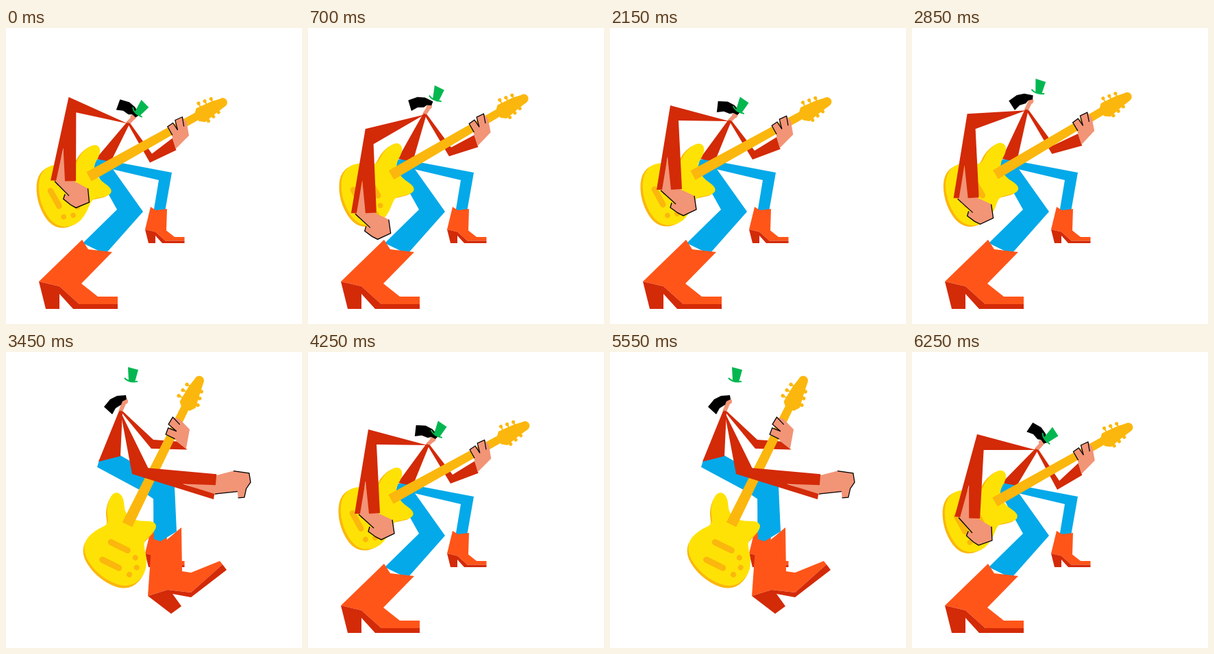
An HTML page with a canvas that plays this animation: 432 by 432 pixels, repeating every 6300 ms.

```html
<!DOCTYPE html>
<html lang="en">
<head>
<meta charset="utf-8">
<title>Guitarist</title>
<style>
html, body { margin: 0; width: 100%; height: 100%; overflow: hidden; background: #fff; }
canvas { display: block; width: 432px; height: 432px; }
</style>
</head>
<body>
<canvas id="stage" width="432" height="432"></canvas>
<script>
const ctx = document.getElementById('stage').getContext('2d');
const LOOP = 2100, STEP = 50, RAD = Math.PI / 180;
const RED = '#d32a08', BLUE = '#04a9e9', ORANGE = '#ff5519', SKIN = '#f29476',
  YELLOW = '#ffe205', GOLD = '#fbb70d', GREEN = '#03b750', BLACK = '#000';

// Key poses: positions, then angle, then scale
const CROUCH = { chest: [174, 136], guitar: [121, 215, -29, .95], fret: [208, 192],
  head: [184, 126, 54], hat: [188, 120, 20] };
const DIP = { chest: [181, 143], guitar: [121, 219, -29.5, .95], fret: [212, 201],
  head: [191, 132, 81], hat: [196, 127, 42] };
const RISE = { chest: [166, 119], guitar: [122, 214, -31, .95], fret: [204, 183],
  head: [173, 103, 12], hat: [184, 91, 2] };
const JUMP = { chest: [167, 87], guitar: [177, 252, -63.7, 1], fret: [212, 141],
  head: [174, 70, 0], hat: [183, 41, 0] };

const lerp = (a, b, k) => a + (b - a) * k;
const lerpAll = (a, b, k) => a.map((v, i) => lerp(v, b[i], k));
const morph = ([a, b], k) => a.map((p, i) => lerpAll(p, b[i], k));
const mix = (a, b, k) =>
  Object.fromEntries(Object.keys(a).map(key => [key, lerpAll(a[key], b[key], k)]));

function ramp(t, from, to) {
  const u = Math.min(1, Math.max(0, (t - from) / (to - from)));
  return u * u * (3 - 2 * u);
}
// Cosine bump that wraps around the loop
function pulse(t, centre, radius) {
  const d = (t - centre + LOOP * 1.5) % LOOP - LOOP / 2;
  return Math.abs(d) < radius ? Math.cos(d / radius * Math.PI / 2) ** 2 : 0;
}

function poseAt(t) {
  const kick = ramp(t, 1130, 1350) - ramp(t, 1680, 1920);
  const dip = pulse(t, 2050, 100) + pulse(t, 575, 150) + pulse(t, 1000, 150);
  const rise = pulse(t, 312, 262) + pulse(t, 788, 212);
  const reach = pulse(t, 1500, 150);
  const strum = Math.sin((t - 14) / 200 * Math.PI) ** 2;

  const pose = mix(mix(mix(CROUCH, RISE, rise), DIP, dip), JUMP, kick);
  pose.guitar[2] += 27 * pulse(t, 575, 110) - 6 * reach;
  pose.hat[1] -= 13 * pulse(t, 1600, 250);

  const [sx, sy] = pose.chest;
  pose.elbow = [
    sx + lerp(-86, 17, kick) + 52 * reach,
    sy + lerp(66 * strum - 42, 91, kick) - 8 * reach,
    lerp(90 + 6 * dip, 8, kick) - 8 * reach];
  pose.kick = kick;
  return pose;
}

function trace(pts) {
  ctx.beginPath();
  pts.forEach(p => ctx.lineTo(...p));
}
function fill(color, pts) {
  trace(pts);
  ctx.fillStyle = color;
  ctx.fill();
}
function line(color, width, pts) {
  trace(pts);
  ctx.strokeStyle = color;
  ctx.lineWidth = width;
  ctx.stroke();
}
function dot(color, x, y, r) {
  ctx.beginPath();
  ctx.arc(x, y, r, 0, 7);
  ctx.fillStyle = color;
  ctx.fill();
}
function blob(color, pts) {
  const mid = (p, q) => [(p[0] + q[0]) / 2, (p[1] + q[1]) / 2];
  ctx.beginPath();
  ctx.moveTo(...mid(pts[pts.length - 1], pts[0]));
  pts.forEach((p, i) => ctx.quadraticCurveTo(...p, ...mid(p, pts[(i + 1) % pts.length])));
  ctx.fillStyle = color;
  ctx.fill();
}
function at([x, y, angle, scale = 1], draw) {
  ctx.save();
  ctx.translate(x, y);
  ctx.rotate(angle * RAD);
  ctx.scale(scale, scale);
  draw();
  ctx.restore();
}
function place([x, y, angle, scale = 1], [u, v]) {
  const c = Math.cos(angle * RAD) * scale, s = Math.sin(angle * RAD) * scale;
  return [x + u * c - v * s, y + u * s + v * c];
}

// Leg shapes: standing, then kicking
const frontLeg = [
  [[131, 192], [146, 192], [200, 268], [145, 330], [112, 314], [162, 265], [128, 204]],
  [[136, 158], [167, 151], [246, 196], [249, 262], [216, 282], [215, 212], [133, 168]]];
const backLeg = [
  [[142, 192], [242, 211], [232, 268], [215, 270], [223, 222], [142, 203]],
  [[160, 160], [240, 200], [232, 268], [215, 270], [216, 215], [150, 170]]];
const shaft = [
  [[111, 309], [120, 323], [155, 327]],
  [[213, 272], [230, 278], [256, 256]]];
const upper = [
  [[110, 373], [134, 392], [163, 392], [163, 403], [107, 403], [78, 377], [48, 370]],
  [[257, 320], [270, 322], [312, 305], [316, 310], [270, 351], [236, 347], [207, 356]]];
const sole = [
  [[163, 410], [98, 410], [78, 388], [78, 410], [58, 410]],
  [[322, 318], [270, 358], [243, 353], [256, 371], [241, 382]]];

function drawBoot(top, k) {
  const foot = morph(upper, k);
  fill(ORANGE, [...top, ...foot]);
  fill(RED, [...foot.slice(3).reverse(), ...morph(sole, k)]);
}

function drawLegs(k) {
  fill(BLUE, morph(backLeg, k));
  at([179, 109, 0, .5], () => drawBoot([[64, 304], [80, 314], [112, 310]], 0));
  fill(BLUE, morph(frontLeg, k));
  drawBoot(morph(shaft, k), k);
}

const bodyShape = [
  [33, -34], [29, -22], [8, -10], [7, 11], [18, 32], [12, 41], [-6, 36], [-17, 32],
  [-36, 48], [-56, 55], [-79, 48], [-90, 28], [-88, -6], [-73, -36], [-52, -46],
  [-30, -37], [-15, -24], [2, -37], [24, -41]];

function drawGuitar() {
  blob(GOLD, bodyShape);
  blob(YELLOW, bodyShape.map(([u, v]) => [u + 4, v]));
  ctx.lineCap = 'round';
  for (const u of [-33.5, -62]) line(GOLD, 9, [[u, -10], [u, 17]]);
  ctx.lineCap = 'butt';
  for (const [u, v] of [[-38, 32], [-50, 40], [-64, 35]]) dot(GOLD, u, v, 4);
  fill(GOLD, [[0, -8], [195, -6], [195, 6], [0, 8]]);
  fill(GOLD, [[190, -6], [195, -11], [220, -9], [234, -6], [235, 8], [220, 10],
    [197, 14], [189, 8]]);
  dot(GOLD, 235, 1, 7);
  for (let i = 0; i < 3; i++) {
    const u = 202 + 10 * i, ends = [[u, 1.7 * i - 16], [u, 15 - 2 * i]];
    line(GOLD, 2, ends);
    ends.forEach(p => dot(GOLD, ...p, 2.7));
  }
}

function drawFretHand() {
  fill(SKIN, [[141, 11], [143, 5], [143, -8], [153, -9], [155, -2], [158, -11], [170, -10],
    [172, 0], [165, 20], [137, 28]]);
  line(BLACK, 1.3, [[154, 4], [158, -11], [170, -10], [165, 4]]);
  line(BLACK, 1.3, [[143, 7], [143, -8], [153, -9], [154, 4]]);
}

// Strumming hand beyond the wrist: closed, then open
const hand = [
  [[0, -18], [8, -35], [28, -38], [37, -19], [33, -11], [25, 0], [18, -2], [20, -8], [0, 14]],
  [[0, -16], [22, -25], [45, -25], [49, -12], [44, -2], [43, 11], [34, 13], [32, 4], [0, 12]]];

function drawStrumArm({ chest, elbow, kick }) {
  at(elbow, () => {
    fill(SKIN, [[74, 3], [123, -16], [129, -14], [130, 10], [123, 14]]);
    ctx.translate(124, 0);
    const pts = morph(hand, kick);
    fill(SKIN, pts);
    line(BLACK, 1.3, pts.slice(1, 7));
    line(BLACK, 1.3, pts.slice(7));
  });
  const sleeve = [[0, 0], [123, 20], [123, 12], [75, 4], [123, -1], [122, -17], [22, -12]];
  fill(RED, [chest, ...sleeve.map(p => place(elbow, p))]);
}

function drawHead() {
  dot(SKIN, 0, 2, 4);
  fill(BLACK, [[-31, 10], [-22, -1], [-12, -6], [1, -7], [2, -1], [-4, 2], [-6, 7],
    [-14, 12], [-19, 21]]);
}

function drawHat() {
  fill(GREEN, [[-5, -19], [10, -15], [5, 3], [-4, 1]]);
  ctx.beginPath();
  ctx.moveTo(-10, -3);
  ctx.quadraticCurveTo(-4, 4, 9, 2);
  ctx.strokeStyle = GREEN;
  ctx.lineWidth = 2;
  ctx.stroke();
}

function draw(t) {
  ctx.clearRect(0, 0, 432, 432);
  const pose = poseAt(t);
  const { chest, guitar, fret, head, hat, kick } = pose;
  const [sx, sy] = chest, [ex, ey] = fret;
  const hips = morph([[[153, 195], [131, 191]], [[167, 152], [135, 160]]], kick);

  drawLegs(kick);
  line(SKIN, 6, [chest, head.slice(0, 2)]);
  fill(RED, [[sx - 2, sy - 1], [sx + 3, sy], ...hips]);
  fill(RED, [[sx - 1, sy - 2], [sx + 4, sy], [ex + 3, ey - 13],
    place(guitar, [141, 11]), place(guitar, [137, 30]), fret]);
  at(guitar, () => { drawGuitar(); drawFretHand(); });
  drawStrumArm(pose);
  at(head, drawHead);
  at(hat, drawHat);
}

const start = performance.now();
function tick() {
  const t = Math.max(0, performance.now() - start) % LOOP;
  draw(Math.floor(t / STEP) * STEP);
  requestAnimationFrame(tick);
}
tick();
</script>
</body>
</html>
```
